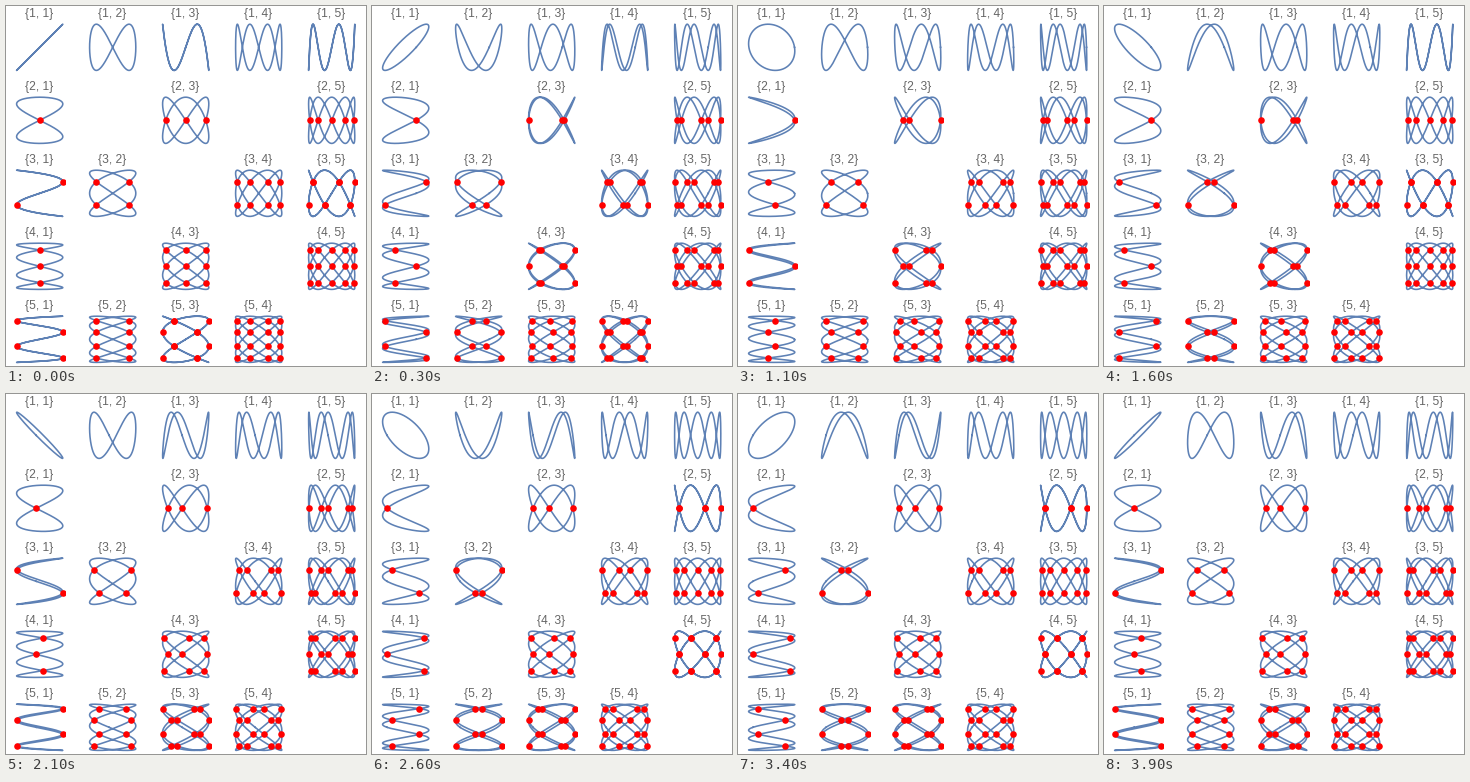
Recreate the animation shown at these times as a matplotlib script. Size 360x360 px, loop 4000 ms.

```python
import math

import numpy as np
import matplotlib.pyplot as plt
from matplotlib.animation import FuncAnimation
from matplotlib.patches import Rectangle

SIZE = 360
DPI = 72          # one point equals one pixel
FRAMES = 40
INTERVAL = 100
STEP = 73         # distance between cells
CENTER = (33.7, 41.3)
RADIUS = 23.1
BLUE = "#5e81b5"
RED = "#ff0000"
GRAY = "#666666"

plt.rcParams["font.family"] = "Liberation Sans"

fig = plt.figure(figsize=(SIZE / DPI, SIZE / DPI), dpi=DPI, facecolor="white")
ax = fig.add_axes([0, 0, 1, 1])
ax.set_xlim(0, SIZE)
ax.set_ylim(SIZE, 0)
ax.axis("off")

T = np.linspace(0, 2 * math.pi, 401)


def crossing_times(a, b):
    """Parameters where two branches with equal x phase meet."""
    k, m = np.meshgrid(np.arange(1, a), np.arange(b))
    return ((2 * m + 1) * math.pi / (2 * b) + k * math.pi / a).ravel()


class Cell:
    def __init__(self, a, b):
        self.a, self.b = a, b
        left, top = (b - 1) * STEP, (a - 1) * STEP
        self.cx, self.cy = CENTER[0] + left, CENTER[1] + top
        self.times = crossing_times(a, b)
        self.curve, = ax.plot([], [], color=BLUE, lw=1.6,
                              solid_joinstyle="round", snap=False)
        self.dots, = ax.plot([], [], "o", color=RED, ms=6.6, mew=0,
                             snap=False, zorder=3)
        box = Rectangle((left + 5, top), 54, STEP, transform=ax.transData)
        self.dots.set_clip_path(box)
        ax.text(self.cx - 0.5, top + 11, f"{{{a}, {b}}}", size=12, color=GRAY,
                ha="center", va="baseline")

    def points(self, t, phase):
        x = self.cx + RADIUS * np.sin(self.a * t + phase)
        y = self.cy - RADIUS * np.sin(self.b * t)
        return x, y

    def update(self, phase):
        self.curve.set_data(*self.points(T, phase))
        self.dots.set_data(*self.points(self.times, phase))


cells = [Cell(a, b) for a in range(1, 6) for b in range(1, 6)
         if math.gcd(a, b) == 1]


def draw(i):
    phase = 2 * math.pi * i / FRAMES
    for cell in cells:
        cell.update(phase)
    return []


anim = FuncAnimation(fig, draw, frames=FRAMES, interval=INTERVAL,
                     repeat=True, repeat_delay=0)
plt.show()
```
